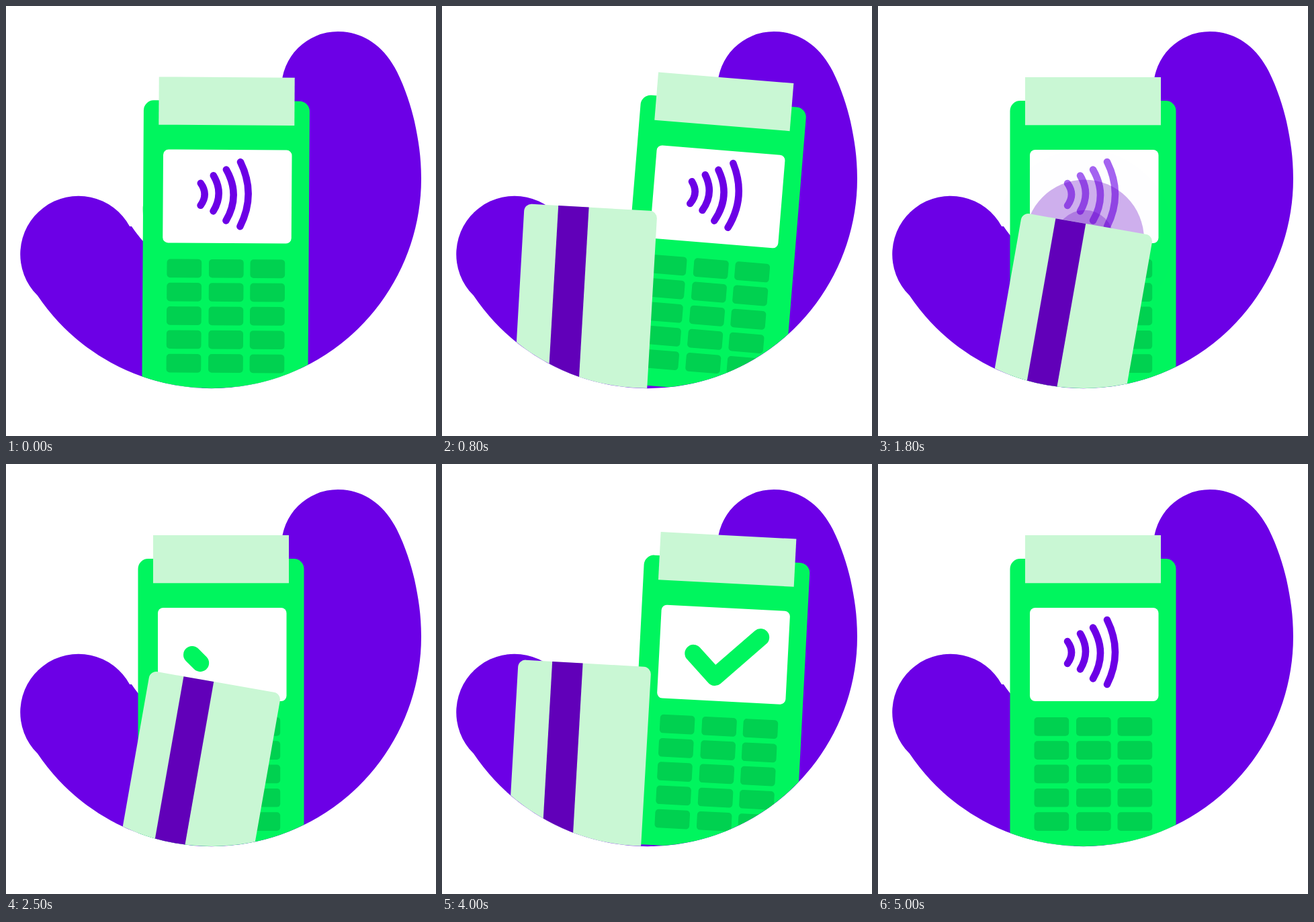
These frames come from a looping animation (640x640 px, 5700 ms). An HTML page:

```html
<!DOCTYPE html>
<html lang="en">
<head>
<meta charset="utf-8">
<title>Contactless payment</title>
<style>
  html, body { margin: 0; width: 100%; height: 100%; overflow: hidden; background: #fff; }
  svg { display: block; width: 100vw; height: 100vh; }
</style>
</head>
<body>
<svg viewBox="0 0 640 640">
  <defs>
    <clipPath id="bowl">
      <path d="M0 0H640V280H617.150A312 312 0 0 1 -5.150 280H0Z"/>
    </clipPath>
  </defs>
  <path fill="#6c00e6" d="M47 431.100A86.700 86.700 0 1 1 184.100 328L187 328C193 337 198 343 204 350
    C240 395 300 410 350 365C405 310 414 200 410 122A84 84 0 0 1 494 38
    C530 38 562 58 582 98C594 122 603 150 608 172C614 200 618 225 618 257A312 312 0 0 1 47 431.100Z"/>
  <g id="scene" clip-path="url(#bowl)">
    <g id="terminal">
      <rect x="196.500" y="141" width="247" height="431" rx="15" fill="#00f55e"/>
      <rect x="226" y="214" width="191.500" height="139" rx="8" fill="#fff"/>
      <g id="keys" fill="#00d150"></g>
      <path id="waves" fill="none" stroke="#6c00e6" stroke-width="10.500" stroke-linecap="round"
        d="M282 264Q294 280.500 282 297M301 252.500Q317 279 301 305.500M320 243.500Q342 281.500 320 319.500M341 232Q365 280 341 328"/>
      <path id="check" fill="none" stroke="#00f55e" stroke-width="26" stroke-linecap="round" stroke-linejoin="round"
        pathLength="100" d="M277 284L310.500 317.500L375.500 255"/>
      <rect id="receipt" x="219" width="202" fill="#c9f7d4"/>
    </g>
    <g id="ripples" fill="#6500c4"></g>
    <g id="card">
      <rect x="-99" y="-148.500" width="198" height="297" rx="11" fill="#c9f7d4"/>
      <rect x="-48.500" y="-148.500" width="45.500" height="297" fill="#6100b9"/>
    </g>
  </g>
</svg>
<script>
const LOOP = 5700, STEP = 100;
const $ = id => document.getElementById(id);
const [scene, terminal, card, ripples, waves, check, receipt] =
  ['scene', 'terminal', 'card', 'ripples', 'waves', 'check', 'receipt'].map($);

function add(parent, tag, attrs) {
  const el = document.createElementNS('http://www.w3.org/2000/svg', tag);
  set(el, attrs);
  parent.append(el);
  return el;
}
function set(el, attrs) {
  for (const name in attrs) el.setAttribute(name, attrs[name]);
}

for (let row = 0; row < 5; row++)
  for (const x of [232.5, 295, 356.5])
    add($('keys'), 'rect', { x, y: 377 + row * 35.3, width: 51.7, height: 27.7, rx: 5 });
const rings = [0, 1, 2].map(() => add(ripples, 'circle', { cx: 307.5, cy: 347 }));

const linear = u => u;
const inOut = u => u < .5 ? 2 * u * u : 1 - 2 * (1 - u) ** 2;
const out = power => u => 1 - (1 - u) ** power;
const progress = (t, start, end) => Math.min(1, Math.max(0, (t - start) / (end - start)));

// Each move is [start, end, target value, easing].
const track = (t, value, ...moves) => moves.reduce((v, [start, end, to, ease = inOut]) =>
  v + (to - v) * ease(progress(t, start, end)), value);

function draw(t) {
  const shift = track(t, 0, [-70, 400, 162], [700, 1000, 0, out(1.67)], [3765, 4200, 162], [4326, 4967, 0]);
  const tilt = track(t, 0, [-70, 400, 8], [700, 1000, 0, out(1.32)], [3848, 4200, 8], [4326, 4967, 0]);
  set(terminal, { transform: `translate(${shift}) rotate(${tilt} 320 356)` });

  const x = track(t, 320, [0, 400, 143.8], [700, 1000, 286.4, out(1.64)], [3765, 4200, 143.8], [4300, 4906, 320]);
  const y = track(t, 426, [700, 1000, 470.8, out(1.67)], [3765, 4200, 426]);
  const turn = track(t, -8, [700, 1000, 10, out(2.44)], [3848, 4200, -8]);
  set(card, { transform: `translate(${x} ${y}) rotate(${turn})` });

  // The card passes behind the terminal on its way out and back.
  if (t >= 600 && t < 4300) scene.append(card);
  else scene.prepend(card);

  rings.forEach((ring, i) => {
    const u = progress(t, 1190 + i * 206, 1802 + i * 206);
    set(ring, { r: 134 * u, opacity: .36 * Math.sin(Math.PI * u) });
  });

  set(waves, { opacity: track(t, 1, [1450, 2350, 0, linear], [4620, 4960, 1, linear]) });
  const drawn = track(t, 0, [2400, 2800, 100]);
  set(check, {
    'stroke-dasharray': `${drawn} 200`,
    opacity: drawn ? track(t, 1, [4300, 4500, 0, linear]) : 0
  });

  const stretch = track(t, 1, [2900, 3350, 1.48], [3350, 3800, 1]);
  set(receipt, { y: 174 - 68 * stretch, height: 71.3 * stretch });
}

function tick(now) {
  draw(Math.floor(now % LOOP / STEP) * STEP);
  requestAnimationFrame(tick);
}
draw(0);
requestAnimationFrame(tick);
</script>
</body>
</html>
```
